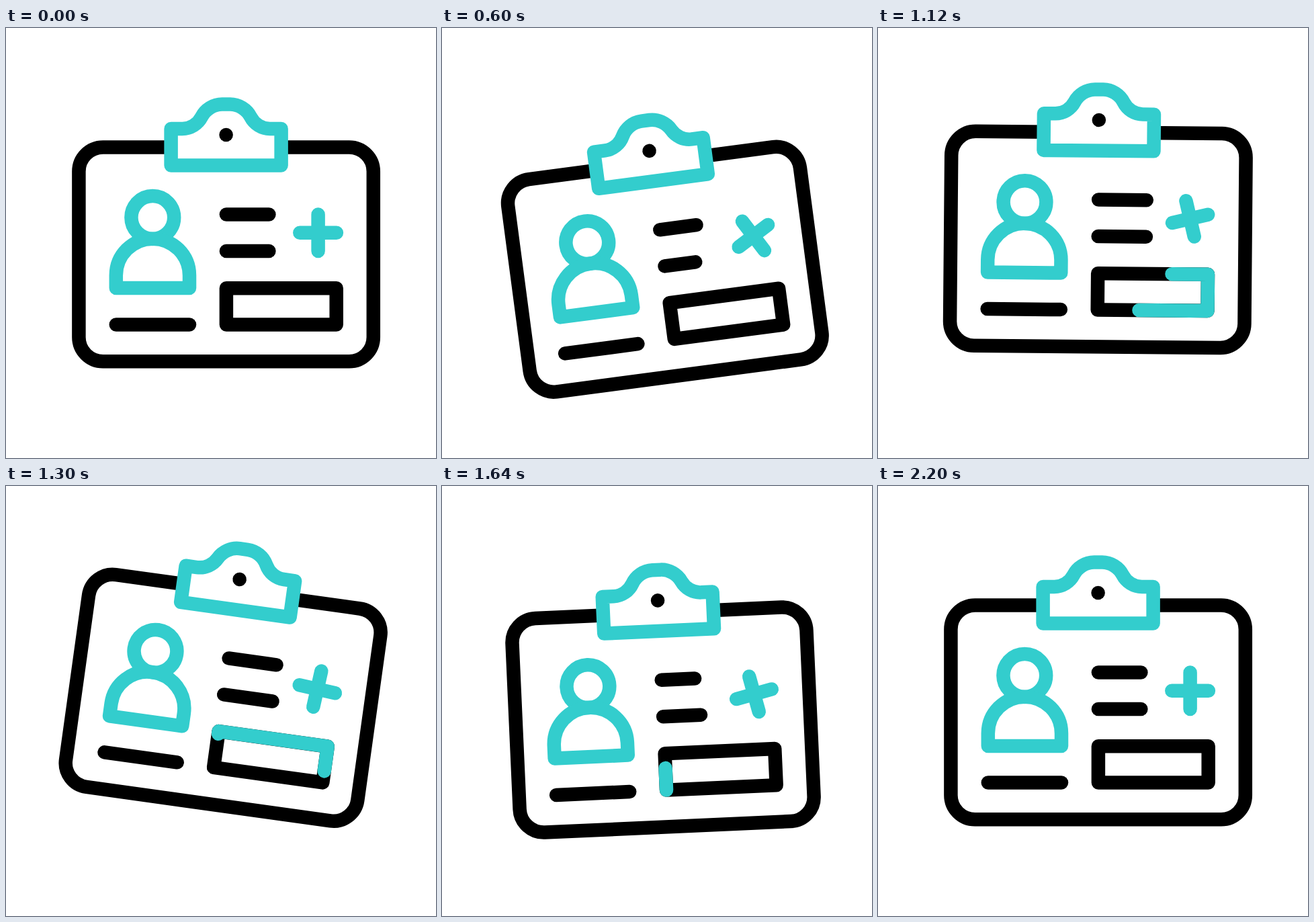
Write an HTML page that moves like this. It is 640x640 px and loops after 2400 ms.

```html
<!DOCTYPE html>
<html lang="en">
<head>
<meta charset="utf-8">
<title>ID card</title>
<style>
  html, body { margin: 0; width: 100%; height: 100%; overflow: hidden; background: #fff; }
  svg { display: block; width: 640px; height: 640px; }
  .ink, .teal { fill: none; stroke: #000; stroke-width: 20.5; stroke-linecap: round; stroke-linejoin: round; }
  .teal { stroke: #33cdcd; }
  #clip { fill: #fff; }
</style>
</head>
<body>
<svg viewBox="0 0 640 640">
  <g id="card">
    <rect class="ink" x="108.4" y="177.4" width="438.4" height="318.9" rx="36"/>
    <path class="teal" id="clip" d="M245.6 204.6v-54.7h16.8c12.2 0 23.2-6.9 28.8-17.8s17.6-18.6 30.4-18.6h12c12.8 0 24.8 7.7 30.4 18.6s16.6 17.8 28.8 17.8h16.8v54.7z"/>
    <circle cx="327.6" cy="159" r="10.3"/>
    <circle class="teal" cx="218.3" cy="282" r="31.9"/>
    <path class="teal" d="M163.8 387v-18.8a54.6 54.6 0 0 1 109.2 0v18.8z"/>
    <path class="ink" d="M163.8 441.5h109.2"/>
    <path class="ink" id="line1"/>
    <path class="ink" id="line2"/>
    <path class="teal" id="plus" d="M437.3 304.7h54.6m-27.3-27.3v54.6"/>
    <rect class="ink" x="327.9" y="387.2" width="163.8" height="54.3"/>
    <path class="teal" id="trail" d="M327.9 441.5h163.8v-54.3h-163.8v54.3"/>
  </g>
</svg>
<script>
  const START = 200, END = 2200, LOOP = 2400;
  const [card, plus, trail, line1, line2] =
    ['card', 'plus', 'trail', 'line1', 'line2'].map(id => document.getElementById(id));
  const perimeter = trail.getTotalLength();

  const ease = p => (1 - Math.cos(Math.PI * Math.min(1, Math.max(0, p)))) / 2;

  // A motion leaves rest, turns back at each peak and settles at rest again.
  const swing = (turns, rest, ...peaks) => t => {
    const times = [START, ...turns, END], stops = [rest, ...peaks, rest];
    return times.slice(1).reduce((value, end, i) =>
      value + (stops[i + 1] - stops[i]) * ease((t - times[i]) / (end - times[i])), rest);
  };

  const even = [700, 1200, 1700], turning = [800, 1410, 1695], stretching = [870, 1185, 1800];
  const lift = swing(even, 0, 25, -25, 12.5);
  const tilt = swing(turning, 0, -10, 9.4, -3.7);
  const spin = swing(turning, 0, -39.5, 8.5, -15);
  const length1 = swing(stretching, 63.5, 50, 74, 45);
  const length2 = swing(stretching, 63.5, 37, 75, 52.5);

  function draw(t) {
    card.setAttribute('transform', `translate(0 ${lift(t)}) rotate(${tilt(t)} 327.6 304.7)`);
    plus.setAttribute('transform', `rotate(${spin(t)} 464.6 304.7)`);
    line1.setAttribute('d', `M327.9 277.5h${length1(t)}`);
    line2.setAttribute('d', `M327.9 332h${length2(t)}`);

    // The tail follows the head round the box 300 ms later.
    const head = perimeter * ease((t - 600) / 900);
    const tail = perimeter * ease((t - 900) / 900);
    trail.style.display = head - tail > 0.01 ? '' : 'none';
    trail.style.strokeDasharray = `${head - tail} 999`;
    trail.style.strokeDashoffset = -tail;
  }

  const origin = performance.now();
  function tick() {
    draw((performance.now() - origin) % LOOP);
    requestAnimationFrame(tick);
  }
  tick();
</script>
</body>
</html>
```
